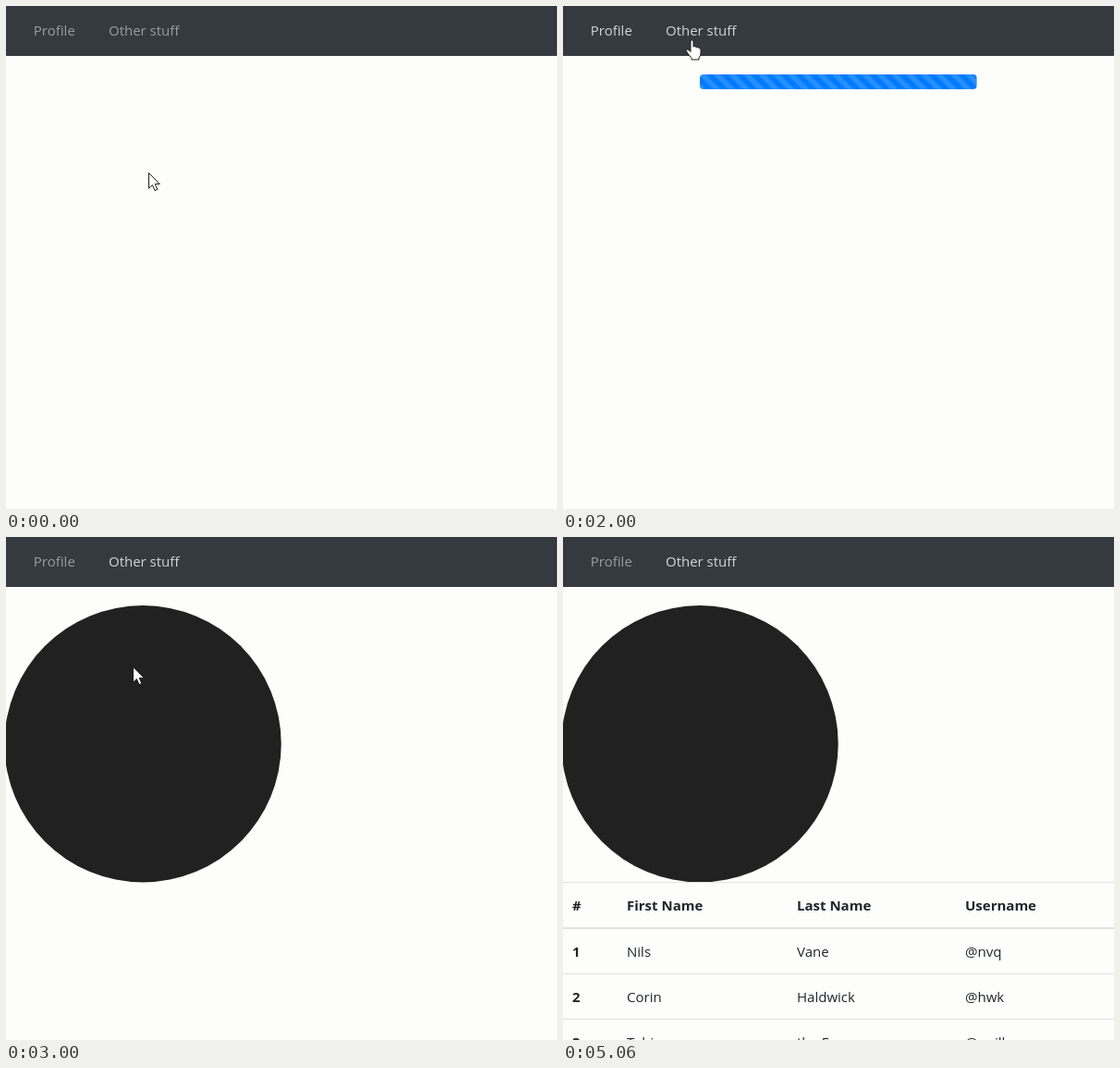
An HTML page for the animation above (5.09 s loop, 596x544 px).

```html
<!DOCTYPE html>
<html lang="en">
<head>
<meta charset="utf-8">
<title>Loading on demand</title>
<style>
  html, body { margin: 0; width: 100%; height: 100%; overflow: hidden; background: #fdfdfc; }
  svg { display: block; width: 596px; height: 544px; font: 15px "Open Sans", "Noto Sans", sans-serif; }
  #table text { fill: #212529; }
  #table .head { font-weight: 700; }
</style>
</head>
<body>
<svg viewBox="0 0 596 544">
  <defs>
    <pattern id="stripes" width="16" height="16" patternUnits="userSpaceOnUse">
      <path d="M0 0L16 16H8L0 8ZM8 0H16V8Z" fill="#fff" fill-opacity=".15"/>
    </pattern>
  </defs>
  <rect width="596" height="544" fill="#fdfdfc"/>
  <rect width="596" height="54" fill="#343a40"/>
  <text id="profile" x="29.8" y="32">Profile</text>
  <text id="other" x="111" y="32">Other stuff</text>

  <g id="bar">
    <rect x="148" y="74" width="299.5" height="16" rx="4" fill="#007bff"/>
    <rect x="148" y="74" width="299.5" height="16" rx="4" fill="url(#stripes)"/>
  </g>
  <circle id="avatar" cx="148" cy="223.7" r="149.7" fill="#212121"/>
  <g id="table"></g>

  <g id="cursor" stroke="#1c1c1c" stroke-linejoin="round" fill="#fff">
    <path id="arrow" d="M.5 .5V17.2L4.4 13.6L7 19.6L9.8 18.4L7.2 12.5H12.2Z"/>
    <path id="hand" transform="translate(-6 0)"
      d="M5 2Q6.5-.5 8 2V8Q9.7 6.8 11 8.6Q12.6 7.8 13.6 9.3Q15.8 8.9 16 11V15Q16 18 14 20V22H6V20.5L1 14Q-.6 11.4 1.5 11Q3 11 5 13.5Z"/>
  </g>
</svg>
<script>
const LOOP = 5090;
const DIM = "#999d9f", LIT = "#d3d5d6";

// Moments at which the page switches state, in ms
const at = { profileClick: 1500, otherClick: 2200, avatar: 2850, table: 3680 };

// Cursor tip: time, x, y; the last stop lies below the stage
const track = [
  [0, 154, 180], [120, 156, 184], [530, 140, 142], [800, 86, 100],
  [960, 86, 100], [1200, 52, 45], [1330, 52, 45], [1440, 51, 32],
  [1640, 51, 32], [2000, 139, 36], [2240, 139, 36], [2500, 138, 95],
  [2560, 138, 95], [2720, 137, 140], [4280, 137, 140], [4580, 180, 560]
];

const el = id => document.getElementById(id);
const show = (id, on) => el(id).setAttribute("visibility", on ? "visible" : "hidden");
const ease = p => p * p * (3 - 2 * p);

function buildTable() {
  const cols = [10, 69, 253, 435];
  const rows = [
    [404, "#", "First Name", "Last Name", "Username"],
    [454, "1", "Nils", "Vane", "@nvq"],
    [503, "2", "Corin", "Haldwick", "@hwk"],
    [552, "3", "Tobin", "the Fern", "@quiller"]
  ];
  const line = (y, h) => `<rect y="${y}" width="596" height="${h}" fill="#dfe3e0"/>`;
  const cells = rows.map(([y, ...words], r) => words.map((word, c) =>
    `<text x="${cols[c]}" y="${y}"${r && c ? "" : ' class="head"'}>${word}</text>`).join(""));
  el("table").innerHTML = line(373, 1) + line(422, 2) + line(472, 1) + line(521, 1) + cells.join("");
}

function tip(t) {
  const i = track.findIndex(k => k[0] > t);
  if (i < 0) return track[track.length - 1].slice(1);
  const [t0, x0, y0] = track[i - 1], [t1, x1, y1] = track[i];
  const p = ease((t - t0) / (t1 - t0));
  return [x0 + (x1 - x0) * p, y0 + (y1 - y0) * p];
}

function draw(t) {
  const [x, y] = tip(t);
  const inLinks = y < 44;
  const overProfile = inLinks && x > 22 && x < 84;
  const overOther = inLinks && x > 103 && x < 196;
  const profileActive = t >= at.profileClick && t < at.otherClick;

  el("profile").setAttribute("fill", profileActive || overProfile ? LIT : DIM);
  el("other").setAttribute("fill", t >= at.otherClick || overOther ? LIT : DIM);

  show("bar", t >= at.profileClick && t < at.avatar);
  const shift = 16 * (1 - ((t - at.profileClick + LOOP) % 1000) / 1000);
  el("stripes").setAttribute("patternTransform", `translate(${148 + shift} 74)`);

  show("avatar", t >= at.avatar);
  show("table", t >= at.table);

  const pointing = overProfile || overOther;
  show("arrow", !pointing);
  show("hand", pointing);
  el("cursor").setAttribute("transform", `translate(${Math.round(x)} ${Math.round(y)})`);
}

buildTable();
const start = performance.now();
function tick() {
  draw((performance.now() - start) % LOOP);
  requestAnimationFrame(tick);
}
tick();
</script>
</body>
</html>
```
